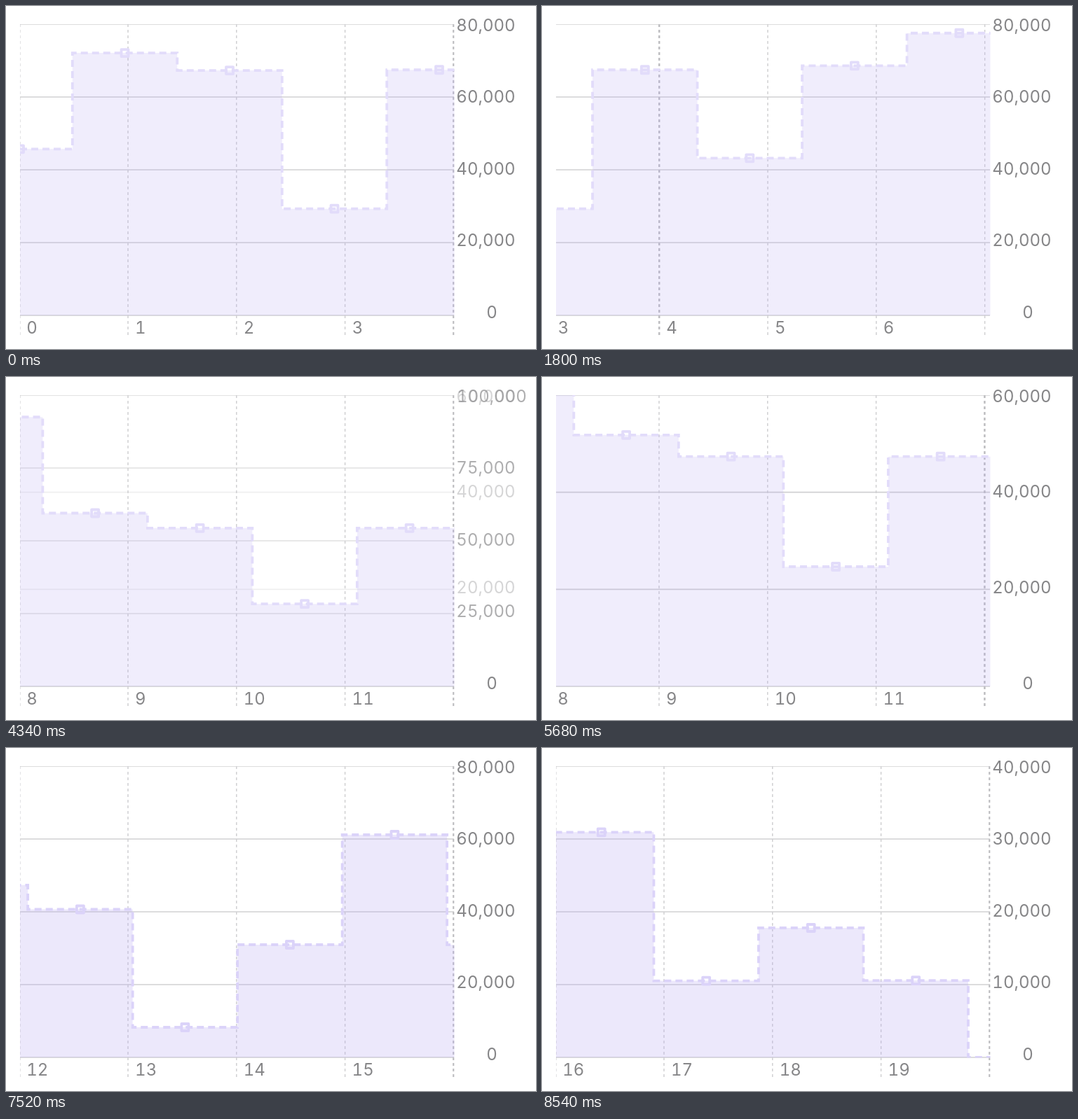
Animation of 756 by 490 pixels, one loop 9900 ms. Source, as an HTML page:

```html
<!DOCTYPE html>
<html lang="en">
<head>
<meta charset="utf-8">
<title>Paged step chart</title>
<style>
  html, body { margin: 0; width: 100%; height: 100%; overflow: hidden; background: #fff; }
  svg { display: block; width: 756px; height: 490px; }
  text { font: 24px Inter, Roboto, sans-serif; font-variant-numeric: tabular-nums; fill: #868688; }
  .rule { stroke: #d0d0d2; stroke-width: 1.7; }
  .column { stroke: #cdcdcf; stroke-width: 1.4; stroke-dasharray: 4 4; }
  .page { stroke: #bebec1; stroke-width: 2.5; }
  .line { fill: none; stroke-width: 3.8; stroke-dasharray: 10 6; }
  .symbols { fill: none; stroke-width: 3.8; stroke-linejoin: round; }
</style>
</head>
<body>
<svg viewBox="0 0 756 490">
  <defs>
    <clipPath id="view"><rect x="20" y="26" width="619.5" height="446"/></clipPath>
    <clipPath id="plot"><rect x="20" y="26" width="619.5" height="416.5"/></clipPath>
  </defs>
  <g id="rules" clip-path="url(#view)"></g>
  <g clip-path="url(#view)"><g id="columns"></g></g>
  <g clip-path="url(#plot)"><g id="marks"></g></g>
  <g id="labels"></g>
</svg>
<script>
const LOOP = 9900;
const LEFT = 20, RIGHT = 639, TOP = 26, BASE = 442, HEIGHT = BASE - TOP;
const UNIT = 154.8, GRID_LEFT = 19.2, POINT_GAP = 149.5, PAGE = 4 * UNIT;
const AXIS_MS = 400, MARK_DELAY = 40, MARK_MS = 380;

const values = [
  45700, 72100, 67300, 29300, 67450, 43200, 68600, 77550, 80530, 51800, 47350,
  24660, 47350, 40670, 8270, 30960, 61150, 30930, 10520, 17790, 10560, 0
];

const stepOf = { 40000: 10000, 60000: 20000, 80000: 20000, 100000: 25000 };

// Each page turn scrolls one page, then rescales the value axis.
const turns = [
  { start: 1460, end: 1960, jump: 0, axis: 2090, max: 100000 },
  { start: 3600, end: 4170, jump: 14, axis: 4185, max: 60000 },
  { start: 5680, end: 6250, jump: 7, axis: 6265, max: 80000, darken: true },
  { start: 7520, end: 8060, jump: 0, axis: 8065, max: 40000 }
];

const lerp = (a, b, p) => a + (b - a) * p;
const smooth = u => u * u * (3 - 2 * u);
const progress = (t, start, length) => smooth(Math.min(1, Math.max(0, (t - start) / length)));
const mix = (a, b, p) => `rgb(${a.map((c, i) => Math.round(lerp(c, b[i], p)))})`;

function add(parent, tag, attrs, text) {
  const node = document.createElementNS('http://www.w3.org/2000/svg', tag);
  for (const name in attrs) node.setAttribute(name, attrs[name]);
  if (text !== undefined) node.textContent = text;
  return parent.appendChild(node);
}

const byId = id => document.getElementById(id);
const columns = byId('columns');
const marks = byId('marks');

for (let k = 0; k <= 21; k++) {
  const x = GRID_LEFT + k * UNIT;
  add(columns, 'line', { class: k % 4 ? 'column' : 'column page', x1: x, x2: x, y1: TOP, y2: 472 });
  add(columns, 'text', { x: x + 10, y: 467.5 }, k);
}

const area = add(marks, 'path', {});
const line = add(marks, 'path', { class: 'line' });
const symbols = add(marks, 'path', { class: 'symbols' });

const hasTick = (value, max) => value <= max && value % stepOf[max] === 0;

const ticks = [];
for (let value = 0; value <= 100000; value += 5000) {
  if (!Object.keys(stepOf).some(max => hasTick(value, +max))) continue;
  const wide = value === 0 || value === 100000;
  ticks.push({
    value,
    rule: add(byId('rules'), 'line', { class: 'rule', x1: LEFT, x2: RIGHT }),
    label: add(byId('labels'), 'text', { x: wide ? 693 : 684.5, 'text-anchor': 'middle' },
      value.toLocaleString('en-US'))
  });
}

function stateAt(t) {
  const state = { offset: 0, from: 80000, to: 80000, axis: 1, mark: 1, dark: 0 };
  turns.forEach((turn, page) => {
    if (t < turn.start) return;
    state.offset = page * PAGE + lerp(turn.jump, PAGE, progress(t, turn.start, turn.end - turn.start));
    if (t < turn.axis) return;
    state.from = state.to;
    state.to = turn.max;
    state.axis = progress(t, turn.axis, AXIS_MS);
    state.mark = progress(t, turn.axis + MARK_DELAY, MARK_MS);
    if (turn.darken) state.dark = state.mark;
  });
  return state;
}

function drawTicks({ from, to, axis }) {
  for (const { value, rule, label } of ticks) {
    const before = hasTick(value, from), after = hasTick(value, to);
    const opacity = lerp(+before, +after, axis);
    const level = lerp(value / (before ? from : to), value / (after ? to : from), axis);
    const y = BASE - HEIGHT * level;
    rule.setAttribute('y1', y);
    rule.setAttribute('y2', y);
    label.setAttribute('y', 446 - 410.3 * level);
    rule.setAttribute('opacity', opacity);
    label.setAttribute('opacity', opacity);
  }
}

function drawMarks({ from, to, mark, dark }) {
  const scale = HEIGHT * lerp(1 / from, 1 / to, mark);
  let path = '', rings = '';
  values.forEach((value, i) => {
    const x = LEFT + i * POINT_GAP, y = BASE - value * scale;
    path += i ? `H${x - POINT_GAP / 2}V${y}` : `M${x} ${y}`;
    rings += `M${x - 5} ${y - 5}h10v10h-10z`;
  });
  const end = LEFT + (values.length - 1) * POINT_GAP;
  path += `H${end}`;
  const stroke = mix([226, 220, 250], [219, 211, 249], dark);
  line.setAttribute('d', path);
  line.setAttribute('stroke', stroke);
  symbols.setAttribute('d', rings);
  symbols.setAttribute('stroke', stroke);
  area.setAttribute('d', `${path}V${BASE}H${LEFT}Z`);
  area.setAttribute('fill', 'rgb(180,165,240)');
  area.setAttribute('fill-opacity', lerp(0.2, 0.255, dark));
}

const began = performance.now();

function frame() {
  const state = stateAt((performance.now() - began) % LOOP);
  const shift = `translate(${-state.offset} 0)`;
  columns.setAttribute('transform', shift);
  marks.setAttribute('transform', shift);
  drawTicks(state);
  drawMarks(state);
  requestAnimationFrame(frame);
}
frame();
</script>
</body>
</html>
```
